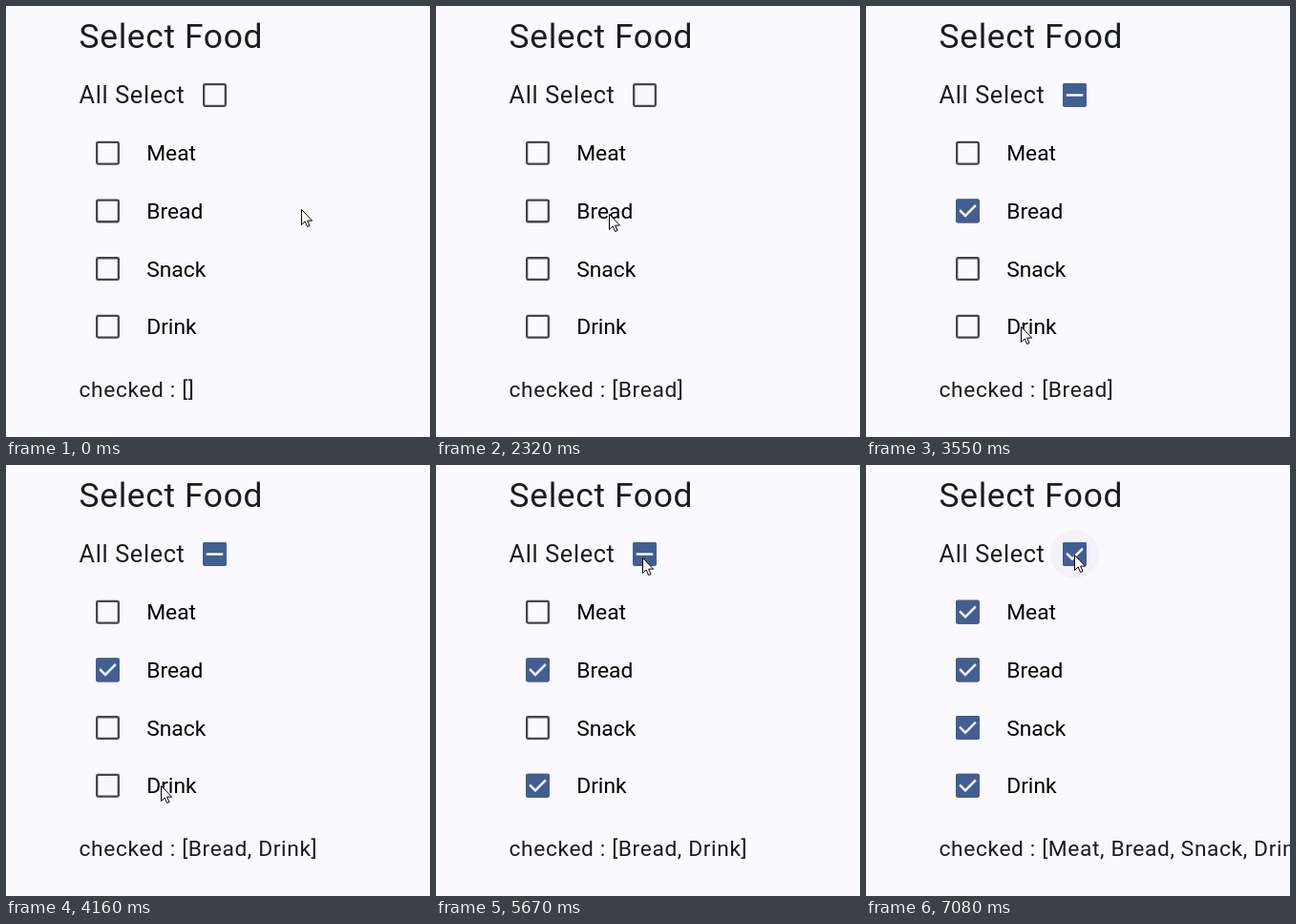
An HTML page for the animation above (8 s loop, 444 by 452 pixels).

```html
<!DOCTYPE html>
<html lang="en">
<head>
<meta charset="utf-8">
<title>Select Food</title>
<style>
  html, body { margin: 0; width: 100%; height: 100%; overflow: hidden; background: #faf9ff; }
  svg { display: block; width: 444px; height: 452px; font-family: Roboto, sans-serif; fill: #191c20; }

  .title { font-size: 35.4px; letter-spacing: .63px; }
  .all { font-size: 25.3px; letter-spacing: .63px; }
  .item { font-size: 22.8px; fill: #000; }
  .result { font-size: 22.77px; letter-spacing: .61px; }

  .mark { fill: none; stroke: #fff; stroke-width: 2.4; stroke-linecap: square; }
  .on { opacity: 0; stroke-dasharray: 1 2; stroke-dashoffset: 1; animation: 8s linear infinite; }
  .on.first { animation-name: first-on; }
  .on.second { animation-name: second-on; }
  .on.rest { animation-name: rest-on; }

  @keyframes first-on {
    0%, 29% { opacity: 0; stroke-dashoffset: 1; }
    30.5% { opacity: 1; stroke-dashoffset: .8; }
    32.6%, 100% { opacity: 1; stroke-dashoffset: 0; }
  }
  @keyframes second-on {
    0%, 52% { opacity: 0; stroke-dashoffset: 1; }
    52.9% { opacity: 1; stroke-dashoffset: .7; }
    53.6%, 100% { opacity: 1; stroke-dashoffset: 0; }
  }
  @keyframes rest-on {
    0%, 77% { opacity: 0; stroke-dashoffset: 1; }
    79% { opacity: 1; stroke-dashoffset: .7; }
    81.9%, 100% { opacity: 1; stroke-dashoffset: 0; }
  }

  .result { opacity: 0; animation: 8s step-end infinite; }
  .result.none { animation-name: show-none; }
  .result.one { animation-name: show-one; }
  .result.two { animation-name: show-two; }
  .result.four { animation-name: show-four; }
  @keyframes show-none { 0% { opacity: 1; } 29%, 100% { opacity: 0; } }
  @keyframes show-one { 0% { opacity: 0; } 29% { opacity: 1; } 52%, 100% { opacity: 0; } }
  @keyframes show-two { 0% { opacity: 0; } 52% { opacity: 1; } 77%, 100% { opacity: 0; } }
  @keyframes show-four { 0% { opacity: 0; } 77%, 100% { opacity: 1; } }

  .halo { opacity: 0; animation: halo 8s linear infinite; }
  @keyframes halo { 0%, 77% { opacity: 0; } 81%, 100% { opacity: .025; } }

  .press { fill: #ff0; opacity: 0; animation: press 8s step-end infinite; }
  @keyframes press {
    0%, 22.375%, 47%, 74.375%, 100% { opacity: 0; }
    21.5%, 46.125%, 73.5% { opacity: .47; }
  }

  .cursor { animation: move 8s step-end infinite; }
  @keyframes move {
    0% { transform: translate(309px, 213px); }
    4.625% { transform: translate(309px, 213px); animation-timing-function: steps(2, start); }
    6.375% { transform: translate(302px, 213px); }
    8% { transform: translate(302px, 212px); }
    10.5% { transform: translate(302px, 212px); animation-timing-function: steps(3, start); }
    13.125% { transform: translate(228px, 214px); animation-timing-function: steps(4, start); }
    16.625% { transform: translate(181px, 218px); }
    31.625% { transform: translate(171px, 213px); }
    35.125% { transform: translate(171px, 216px); }
    36% { transform: translate(171px, 216px); animation-timing-function: steps(3, start); }
    38.75% { transform: translate(171px, 240px); animation-timing-function: steps(4, start); }
    42.5% { transform: translate(165px, 312px); animation-timing-function: steps(3, start); }
    45.25% { transform: translate(162px, 336px); }
    56.875% { transform: translate(162px, 336px); animation-timing-function: steps(4, start); }
    60.375% { transform: translate(177px, 260px); animation-timing-function: steps(8, start); }
    67.375% { transform: translate(181px, 171px); animation-timing-function: steps(5, start); }
    71.75% { transform: translate(216px, 97px); animation-timing-function: steps(3, start); }
    74.375% { transform: translate(225px, 87px); }
    77%, 100% { transform: translate(218px, 94px); }
  }
</style>
</head>
<body>
<svg viewBox="0 0 444 452">
  <defs>
    <rect id="empty" x="1.15" y="1.15" width="22.7" height="22.7" rx="1.3" fill="none" stroke="#44474e" stroke-width="2.3"/>
    <rect id="fill" width="25" height="25" rx="2.4" fill="#435e91"/>
    <g id="check">
      <use href="#fill"/>
      <path class="mark" pathLength="1" d="M5 12.5 10 17.5 20 7.5"/>
    </g>
    <g id="dash">
      <use href="#fill"/>
      <path class="mark" pathLength="1" d="M5 12.5H20"/>
    </g>
  </defs>

  <text class="title" x="76.6" y="44">Select Food</text>

  <text class="all" x="76.6" y="102">All Select</text>
  <circle class="halo" cx="218.5" cy="93.5" r="25.3"/>
  <g transform="translate(206 81)">
    <use href="#empty"/>
    <g class="on first"><use href="#dash"/></g>
    <g class="on rest"><use href="#check"/></g>
  </g>

  <g transform="translate(94 141.7)">
    <use href="#empty"/>
    <g class="on rest"><use href="#check"/></g>
    <text class="item" x="53.2" y="20.6">Meat</text>
  </g>
  <g transform="translate(94 202.4)">
    <use href="#empty"/>
    <g class="on first"><use href="#check"/></g>
    <text class="item" x="53.2" y="20.6">Bread</text>
  </g>
  <g transform="translate(94 263.1)">
    <use href="#empty"/>
    <g class="on rest"><use href="#check"/></g>
    <text class="item" x="53.2" y="20.6">Snack</text>
  </g>
  <g transform="translate(94 323.8)">
    <use href="#empty"/>
    <g class="on second"><use href="#check"/></g>
    <text class="item" x="53.2" y="20.6">Drink</text>
  </g>

  <text class="result none" x="76.6" y="410">checked : []</text>
  <text class="result one" x="76.6" y="410">checked : [Bread]</text>
  <text class="result two" x="76.6" y="410">checked : [Bread, Drink]</text>
  <text class="result four" x="76.6" y="410">checked : [Meat, Bread, Snack, Drink]</text>

  <g class="cursor">
    <circle class="press" r="12"/>
    <path d="M.5 .5v16l3.7-3.6 2.4 5.6 2.4-1-2.4-5.4h5z" fill="#fff" stroke="#000"/>
  </g>
</svg>
</body>
</html>
```
